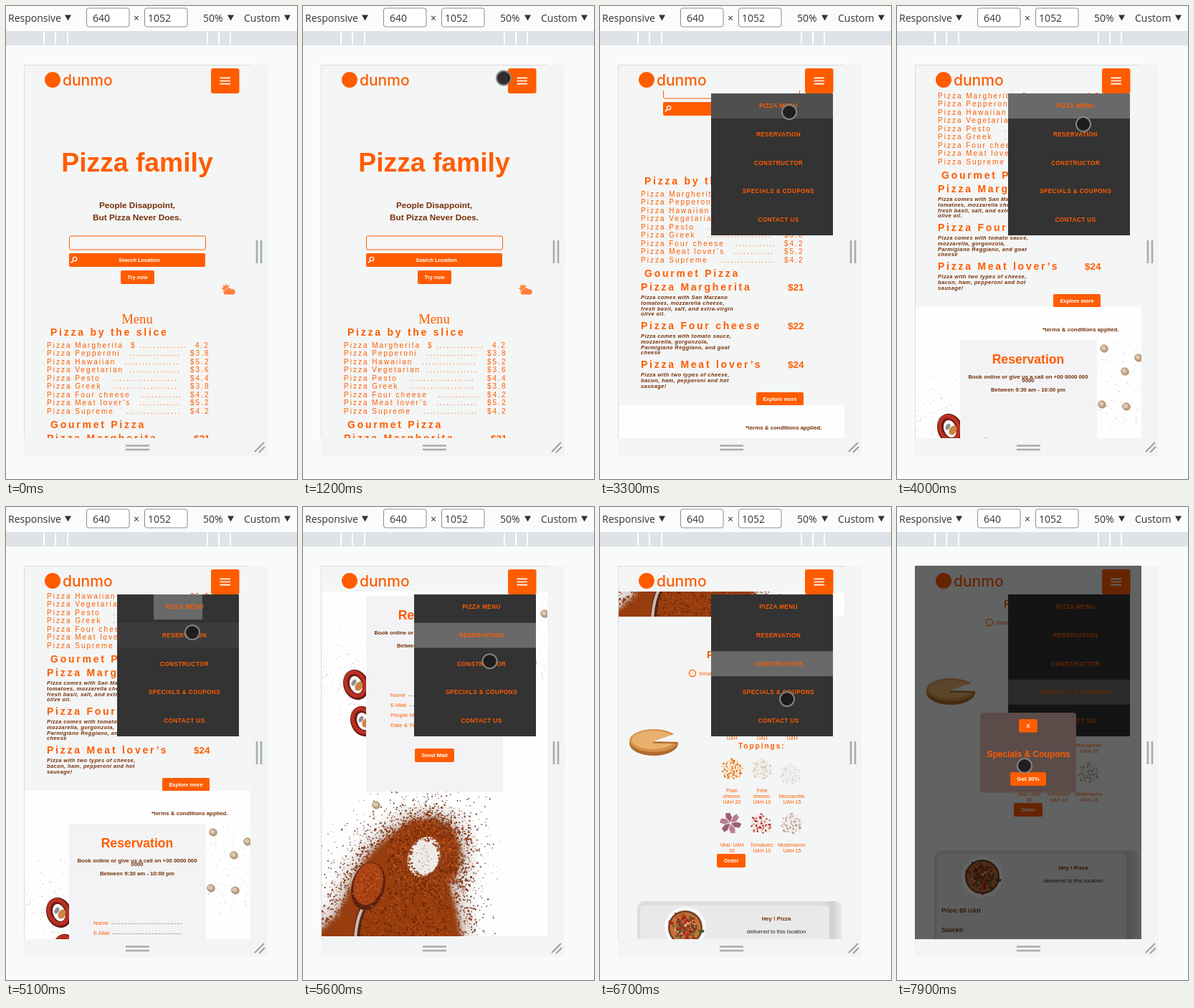
An HTML page that plays this animation: 406 px wide and 660 px high, repeating every 8 s.

```html
<!DOCTYPE html>
<html lang="en">
<head>
<meta charset="utf-8">
<style>
html, body { margin: 0; width: 100%; height: 100%; overflow: hidden; background: #f9fbfb; }
svg { display: block; width: 406px; height: 660px; font-family: "Liberation Sans", Arial, sans-serif; white-space: pre; }
.b { font-weight: 700; }
.i { font-weight: 700; font-style: italic; letter-spacing: .4px; }
.m { text-anchor: middle; }
.bar { font-family: "Open Sans", "Noto Sans", sans-serif; }
.serif { font-family: "Liberation Serif", serif; text-anchor: middle; }
.brand { font-family: Inter, sans-serif; font-weight: 500; }
.head { font-weight: 700; letter-spacing: 2.75px; }
.row { letter-spacing: 2px; }
.nav { font-weight: 700; letter-spacing: .4px; text-anchor: middle; }
</style>
</head>
<body>
<svg id="stage" viewBox="0 0 406 660"></svg>
<script>
const ORANGE = '#ff5c00', BROWN = '#753008', BG = '#f4f5f5';
const stage = document.getElementById('stage');

let seed = 7;
const rnd = () => (seed = (seed * 16807) % 2147483647) / 2147483647;
const gauss = () => rnd() + rnd() + rnd() - 1.5;

const text = (x, y, s, size, cls = '', fill = ORANGE) =>
  `<text x="${x}" y="${y}" font-size="${size}" class="${cls}" fill="${fill}">${s.replace(/&/g, '&amp;')}</text>`;
const rect = (x, y, w, h, fill, more = '') =>
  `<rect x="${x}" y="${y}" width="${w}" height="${h}" fill="${fill}" ${more}/>`;
const circle = (x, y, r, fill, more = '') =>
  `<circle cx="${x}" cy="${y}" r="${r}" fill="${fill}" ${more}/>`;
const ellipse = (x, y, rx, ry, fill, turn = 0, more = '') =>
  `<ellipse rx="${rx}" ry="${ry}" fill="${fill}" transform="translate(${x} ${y}) rotate(${turn})" ${more}/>`;
const path = (d, fill, more = '') => `<path d="${d}" fill="${fill}" ${more}/>`;
const line = (d, stroke, w, more = '') => path(d, 'none', `stroke="${stroke}" stroke-width="${w}" ${more}`);
const button = (x, y, w, h, s, size = 7.4) =>
  rect(x, y, w, h, ORANGE, 'rx="2"') + text(x + w / 2, y + h / 2 + 2.7, s, size, 'b m', '#fff');
const lines = (x, y, list, step, size, cls, fill) =>
  list.map((s, i) => text(x, y + i * step, s, size, cls, fill)).join('');

// Loose grains: place() gives the position of each one
function grains(n, fill, size, place) {
  let d = '';
  for (let i = 0; i < n; i++) {
    const [x, y] = place(), s = size * (.5 + rnd());
    d += `M${x.toFixed(1)} ${y.toFixed(1)}h${s.toFixed(1)}v${s.toFixed(1)}h${-s.toFixed(1)}z`;
  }
  return path(d, fill);
}
const around = (x, y, dx, dy = dx) => () => [x + gauss() * dx, y + gauss() * dy];

function hero() {
  const icon = circle(96, 353, 2.7, 'none', 'stroke="#fff" stroke-width="1.3"') +
    line('M94 355l-3 3.4', '#fff', 1.6);
  let rays = '';
  for (let k = 0; k < 8; k++) rays += `M307 394l${6 * Math.cos(k * Math.PI / 4)} ${6 * Math.sin(k * Math.PI / 4)}`;
  return text(183, 230.5, 'Pizza family', 37.3, 'b m') +
    lines(183, 282, ['People Disappoint,', 'But Pizza Never Does.'], 17, 11.8, 'b m', BROWN) +
    rect(88.5, 321, 190, 19, '#f6f6f6', `rx="2" stroke="${ORANGE}"`) +
    rect(88, 345, 190, 19, ORANGE, 'rx="2"') + icon +
    text(186, 356.8, 'Search Location', 7.4, 'b m', '#fff') +
    button(160, 369, 47, 19, 'Try now') +
    line(rays, '#ff7f3a', 1.5) + circle(307, 394, 4, '#ff7f3a') +
    path('M305 403a4 4 0 0 1 1-7a5.5 5.5 0 0 1 9-1a4 4 0 0 1 2 8z', '#ff7f3a', `stroke="${BG}" stroke-width=".8"`);
}

function menuList() {
  const rows = [
    ['Margherita', 186, 14, '4.2'], ['Pepperoni', 172, 15, '$3.8'], ['Hawaiian', 166, 16, '$5.2'],
    ['Vegetarian', 172, 15, '$3.6'], ['Pesto', 149, 19, '$4.4'], ['Greek', 149, 19, '$3.8'],
    ['Four cheese', 189, 12, '$4.2'], ['Meat lover\u2019s', 186, 12, '$5.2'], ['Supreme', 168, 16, '$4.2']];
  const big = [
    ['Margherita', '$21', 608, ['Pizza comes with San Marzano', 'tomatoes, mozzarella cheese,', 'fresh basil, salt, and extra-virgin', 'olive oil.']],
    ['Four cheese', '$22', 662, ['Pizza comes with tomato sauce,', 'mozzarella, gorgonzola,', 'Parmigiano Reggiano, and goat', 'cheese']],
    ['Meat lover\u2019s', '$24', 716, ['Pizza with two types of cheese,', 'bacon, ham, pepperoni and hot', 'sausage!']]];
  return text(183, 443, 'Menu', 18.7, 'serif') +
    text(62, 460, 'Pizza by the slice', 14, 'head') +
    rows.map(([name, x, n, price], i) => {
      const y = 476.9 + 11.5 * i;
      return text(57, y, 'Pizza ' + name, 10, 'row') + text(x, y, '.'.repeat(n), 10, 'row') +
        text(i ? 257 : 264, y, price, 10, 'row');
    }).join('') + text(174, 476.9, '$', 10) +
    text(62, 588.5, 'Gourmet Pizza', 14, 'head') +
    big.map(([name, price, y, about]) => text(57, y, 'Pizza ' + name, 14, 'head') +
      text(262, y, price, 13.6, 'b') + lines(57, y + 12, about, 7.8, 7.5, 'i', BROWN)).join('') +
    button(218, 750, 66, 19, 'Explore more');
}

const nut = (x, y) => ellipse(x, y, 6, 5.5, '#b99c80', 30) + ellipse(x - 1, y - 1, 3.5, 3, '#dcc8b0', 30);

const ring = (x, y, color, w) => ellipse(x, y, 13, 17, 'none', -20, `stroke="${color}" stroke-width="${w}"`);
const pepper = (x, y) => ring(x, y, '#6b1c16', 9) + ring(x - 1, y - 1, '#bb3023', 5) +
  ellipse(x + 4, y + 2, 5, 7, '#cf8346', 30) + ellipse(x - 3, y - 3, 3, 5, '#8f9294', 30);

function spice() {
  const edge = [[20, 1284], [48, 1260], [64, 1225], [84, 1186], [108, 1160], [130, 1143], [152, 1127], [185, 1125],
    [208, 1139], [220, 1166], [216, 1196], [203, 1216], [212, 1245], [222, 1295]];
  const body = 'M' + edge.join('L') + 'L20 1295z';
  const rim = spread => () => {
    const k = Math.floor(rnd() * (edge.length - 1)), f = rnd(), [a, b] = edge[k], [c, d] = edge[k + 1];
    return [a + (c - a) * f + gauss() * spread, b + (d - b) * f + gauss() * spread];
  };
  const inRing = () => {
    const a = rnd() * 6.28, r = .65 + rnd() * .65;
    return [167 + 40 * r * Math.cos(a), 1178 + 42 * r * Math.sin(a)];
  };
  const inBase = () => [75 + rnd() * 130, 1215 + rnd() * 75];
  const inHole = () => {
    const a = rnd() * 6.28, r = .8 + rnd() * .3;
    return [169 + 23 * r * Math.cos(a), 1178 + 29 * r * Math.sin(a)];
  };
  return `<g clip-path="url(#photo)">` +
    path(body, '#8a6655', 'stroke="#8a6655" stroke-width="16" opacity=".55" filter="url(#soft)"') +
    grains(1300, '#7a5748', 1.5, rim(44)) + grains(600, '#574a44', 1.1, rim(80)) +
    path(body, '#983c11', 'filter="url(#haze)"') +
    grains(1000, '#8f3c17', 1.9, rim(22)) +
    grains(420, '#bd5420', 1.6, inRing) + grains(420, '#712708', 1.7, inRing) +
    grains(420, '#712708', 1.7, inBase) + grains(300, '#bb4f1d', 1.5, inBase) +
    ellipse(169, 1178, 22, 29, '#eeeae8', 25) + grains(220, '#94431f', 1.7, inHole) +
    grains(40, '#a39a96', 1.2, around(169, 1178, 14, 18)) +
    line('M84 1250Q76 1264 75 1291', '#4f281c', 9) + line('M83 1250Q75 1264 73 1291', '#d3b9ac', 4) +
    ellipse(91, 1219, 23, 34, '#5c210f', 15) + ellipse(91, 1216, 20, 30, '#ac4315', 15) +
    grains(130, '#c65b22', 1.5, around(91, 1215, 18, 27)) + grains(110, '#87310d', 1.5, around(93, 1219, 18, 27)) +
    '</g>';
}

function reservation() {
  const fields = ['Name', 'E-Mail', 'People Number', 'Date & Time'];
  const ends = [147, 148, 178, 170];
  return rect(25, 768, 316, 521, '#fefefe') +
    text(203, 802, '*terms & conditions applied.', 7.9, 'b', BROWN) +
    grains(120, '#d9d2ce', 1, () => [278 + rnd() * 62, 815 + rnd() * 125]) +
    grains(110, '#c5bcb7', 1, around(58, 930, 34, 60)) +
    [[289, 826], [318, 858], [337, 839], [286, 904], [320, 907], [102, 1106]].map(p => nut(...p)).join('') +
    pepper(74, 938) + pepper(84, 989) + spice() +
    rect(88, 814, 191, 273, '#f3f3f5') +
    text(183, 847, 'Reservation', 17.6, 'b m') +
    text(183, 867.5, 'Book online or give us a call on +00 0000 000', 7.8, 'b m', BROWN) +
    text(183, 872.5, '0000', 7.8, 'b m', BROWN) +
    text(183, 885.5, 'Between 9:30 am - 10:00 pm', 7.8, 'b m', BROWN) +
    fields.map((s, i) => text(122, 954.8 + 14.1 * i, s, 7.8) +
      line(`M${ends[i]} ${953.4 + 14.1 * i}H246`, '#b5997f', .9, 'stroke-dasharray="3.2 1.4"')).join('') +
    button(156, 1027, 55, 19, 'Send Mail', 7.8);
}

// Chopped pieces spread evenly over a small disc
function shards(x, y, colors) {
  let out = '';
  for (let i = 0; i < 38; i++) {
    const a = i * 2.4, r = 2.5 * Math.sqrt(i);
    out += ellipse((x + r * Math.cos(a)).toFixed(1), (y + r * Math.sin(a) * .9).toFixed(1),
      1.3 + rnd() * 1.6, .9 + rnd(), colors[i % colors.length], Math.floor(rnd() * 180));
  }
  return out;
}

function builder() {
  let veal = '';
  for (let k = 0; k < 6; k++)
    veal += path('M1 0L9-4L15-3L14 3L7 4z', k % 2 ? '#b97f93' : '#9d5d78', `transform="translate(182 1577) rotate(${k * 60 + 15})"`);
  const label = (x, y, ...s) => lines(x, y, s, 8, 7.2, 'm');
  return rect(25, 1289, 316, 560, BG) +
    text(149, 1347, 'Pizza size', 14.6, 'b') +
    circle(129, 1368, 4.6, '#fbe9df', `stroke="${ORANGE}" stroke-width="1.2"`) + text(138, 1370.8, 'Small', 7.8) +
    ellipse(75, 1466, 34, 17, '#b06c30') + ellipse(75, 1462, 34, 16, '#d38f48') + ellipse(74, 1461, 30, 13, '#e8b06c') +
    path('M74 1463L106 1452L112 1464z', BG) + line('M74 1464.5L108 1465', '#a9662b', 2) +
    [184, 226, 268].map(x => label(x, 1460.5, 'UAH')).join('') +
    text(193, 1473, 'Toppings:', 10, 'b row') +
    shards(184, 1502, ['#f08a35', '#ffc98d', '#e87422']) + shards(226, 1502, ['#e7d9cb', '#f0e8e0', '#d8c9bb']) +
    shards(266, 1509, ['#e5e3e1', '#ecebea', '#dcdad8']) + veal +
    shards(225, 1578, ['#b92f2a', '#f0dcd6', '#cf7468']) + shards(267, 1578, ['#cdb5aa', '#efe6e1', '#bda196']) +
    label(184, 1533.5, 'Plain', 'cheese:', 'UAH 20') + label(226, 1533.5, 'Feta', 'cheese:', 'UAH 10') +
    label(268, 1541.5, 'Mozzarella:', 'UAH 15') + label(184, 1609.5, 'Veal: UAH', '30') +
    label(226, 1609.5, 'Tomatoes:', 'UAH 10') + label(268, 1609.5, 'Mushrooms:', 'UAH 15') +
    button(163, 1620, 40, 19, 'Order', 7.6) +
    rect(52, 1686, 286, 200, 'url(#side)', 'rx="10"') + rect(56, 1692, 264, 200, '#e9e9e9', 'rx="5"') +
    circle(119, 1723, 29, '#fafafa') + circle(119, 1723, 24, '#6d4023') + circle(119, 1723, 21.5, '#c4713a') +
    shards(119, 1723, ['#a62a1c', '#4d6330', '#e9c48c', '#b93a26']) +
    grains(50, '#9a2c1c', 3, around(118, 1722, 20)) + grains(25, '#3f5a2a', 2.5, around(118, 1722, 20)) +
    text(246, 1712.8, 'Hey ! Pizza', 7.8, 'b m', BROWN) +
    text(246, 1731, 'delivered to this location', 7.7, 'm', '#222') +
    text(62, 1773, 'Price: 60 UAH', 8.3, 'b', BROWN) + text(62, 1800, 'Sauces:', 8.3, 'b', BROWN);
}

const NAV = ['PIZZA MENU', 'RESERVATION', 'CONSTRUCTOR', 'SPECIALS & COUPONS', 'CONTACT US'];
const NAV_W = [54, 63, 70, 100];
const navY = i => 122 + 39.6 * i;

function toolbar() {
  const arrow = x => path(`M${x} 12.5h9l-4.5 8z`, '#333');
  const word = (x, s) => text(x, 22, s, 14, 'bar', '#333');
  const field = x => rect(x, 3, 59.5, 26, '#fff', 'rx="3" stroke="#8c8c8c"');
  return rect(0, 0, 406, 35, '#fafbfd') + rect(0, 35, 406, 20, '#dfe3e8') +
    [53, 69, 86, 281, 297, 313].map(x => rect(x - 1, 36, 2, 18, '#fff')).join('') +
    field(112.5) + field(193.5) + word(3, 'Responsive') + word(121, '640') + word(178, '×') +
    word(198, '1052') + word(275, '50%') + word(332, 'Custom') + arrow(82) + arrow(309) + arrow(388);
}

stage.innerHTML = `<defs>
  <clipPath id="view">${rect(25, 82, 316, 521, '#000')}</clipPath>
  <clipPath id="photo">${rect(25, 1087, 251, 202, '#000')}</clipPath>
  <clipPath id="drop"><rect id="dropBox" x="155" y="122" width="170" height="198"/></clipPath>
  <filter id="soft"><feGaussianBlur stdDeviation="14"/></filter>
  <filter id="haze"><feGaussianBlur stdDeviation="3"/></filter>
  <linearGradient id="side"><stop offset=".9" stop-color="#dedede"/><stop offset=".95" stop-color="#cfcfcf"/><stop offset="1" stop-color="#ececec"/></linearGradient>
  </defs>` +
  rect(0, 0, 406, 660, '#f9fbfb') + toolbar() + rect(25, 82, 340, 546, '#f3f5f5') +
  `<g clip-path="url(#view)">
    ${rect(25, 82, 316, 521, BG)}
    <g id="page">${hero() + menuList() + reservation() + builder()}</g>
    ${rect(25, 82, 316, 36, BG) + line('M341 82.5H25.5V603', '#d8dbdc', 1)}
    ${circle(65, 103, 11, ORANGE) + text(79, 111, 'dunmo', 21, 'brand')}
    ${rect(286, 87, 39.5, 35, ORANGE, 'rx="3"') + line('M298.5 100.3h14.5m-14.5 4.2h14.5m-14.5 4.2h14.5', '#fff', 1.7)}
    <g clip-path="url(#drop)">
      ${rect(155, 122, 170.5, 198, '#333')}
      ${NAV_W.map((w, i) => rect(155, navY(i), 170, 35, '#fff', `id="band${i}"`)).join('')}
      ${NAV.map((s, i) => text(249, navY(i) + 20.4, s, 8.2, 'nav')).join('')}
      ${NAV_W.map((w, i) => rect(249 - w / 2, navY(i), w, 35, '#36a9d0', `id="tap${i}"`)).join('')}
    </g>
    <g id="popup">
      ${rect(25, 82, 316, 521, '#000', 'opacity=".6"') + rect(116, 287, 134, 111.5, '#5b4c49', 'rx="4"')}
      ${button(170, 296, 26, 18.5, 'X') + text(183.5, 349, 'Specials & Coupons', 12, 'b m') + button(158, 370, 50, 19, 'Get 30%', 7.8)}
    </g>
    ${circle(0, 0, 10, 'rgba(25,25,25,.9)', 'id="cursor" stroke="#858585" stroke-width="2"')}
  </g>` +
  line('M350 327v32m6 -32v32M167 613.5h33m-33 5.5h33', '#a9abac', 2.6) +
  line('M347 622l13-13m-7 14l8-8', '#a0a2a3', 2.2);

const $ = id => document.getElementById(id);
const show = (id, a) => $(id).setAttribute('opacity', a);
const part = (t, from, len) => Math.min(1, Math.max(0, (t - from) / len));
const ease = u => u * u * (3 - 2 * u);

const CURSOR = [[600, 315, 84], [800, 187, 84], [900, 187, 84], [1300, 311, 106], [1700, 311, 106], [2200, 281, 140],
  [2300, 274, 144], [2400, 264, 148], [3700, 264, 148], [4000, 260, 165], [4500, 260, 175], [5300, 260, 175],
  [5800, 261, 242], [6200, 261, 242], [6700, 261, 268], [7100, 258, 258], [7400, 232, 266], [7500, 180, 253],
  [7600, 90, 290], [7700, 75, 340], [7800, 140, 380], [7900, 178, 361]];
const HOVER = [2900, 4830, 5770, 6900, 9e9];
const TAP = [[2900, 3000], [4800, 4950], [5950, 6100], [7000, 7100]];

function cursorAt(t) {
  const k = CURSOR.findIndex(p => p[0] >= t);
  if (k < 0) return CURSOR.at(-1).slice(1);
  if (!k) return CURSOR[0].slice(1);
  const a = CURSOR[k - 1], b = CURSOR[k], u = part(t, a[0], b[0] - a[0]);
  return [a[1] + (b[1] - a[1]) * u, a[2] + (b[2] - a[2]) * u];
}

function draw(t) {
  const scroll = 348 * ease(part(t, 2900, 700)) + 343 * ease(part(t, 5000, 620)) + 516 * ease(part(t, 6100, 782));
  $('page').setAttribute('transform', `translate(0 ${-Math.round(scroll)})`);
  $('dropBox').setAttribute('height', 198 * ease(part(t, 1400, 400)));
  NAV_W.forEach((w, i) => {
    const width = 170 * (1 - part(t, HOVER[i + 1], 450)), band = $('band' + i);
    band.setAttribute('x', 240 - width / 2);
    band.setAttribute('width', width);
    show('band' + i, .265 * part(t, HOVER[i], 500) ** 3);
    show('tap' + i, t >= TAP[i][0] && t < TAP[i][1] ? .55 : 0);
  });
  show('popup', part(t, 7050, 250));
  $('cursor').setAttribute('transform', `translate(${cursorAt(t)})`);
  show('cursor', t < 600 ? 0 : 1);
}

function tick() {
  draw(Math.floor(performance.now() % 8000 / 100) * 100);
  requestAnimationFrame(tick);
}
tick();
</script>
</body>
</html>
```
